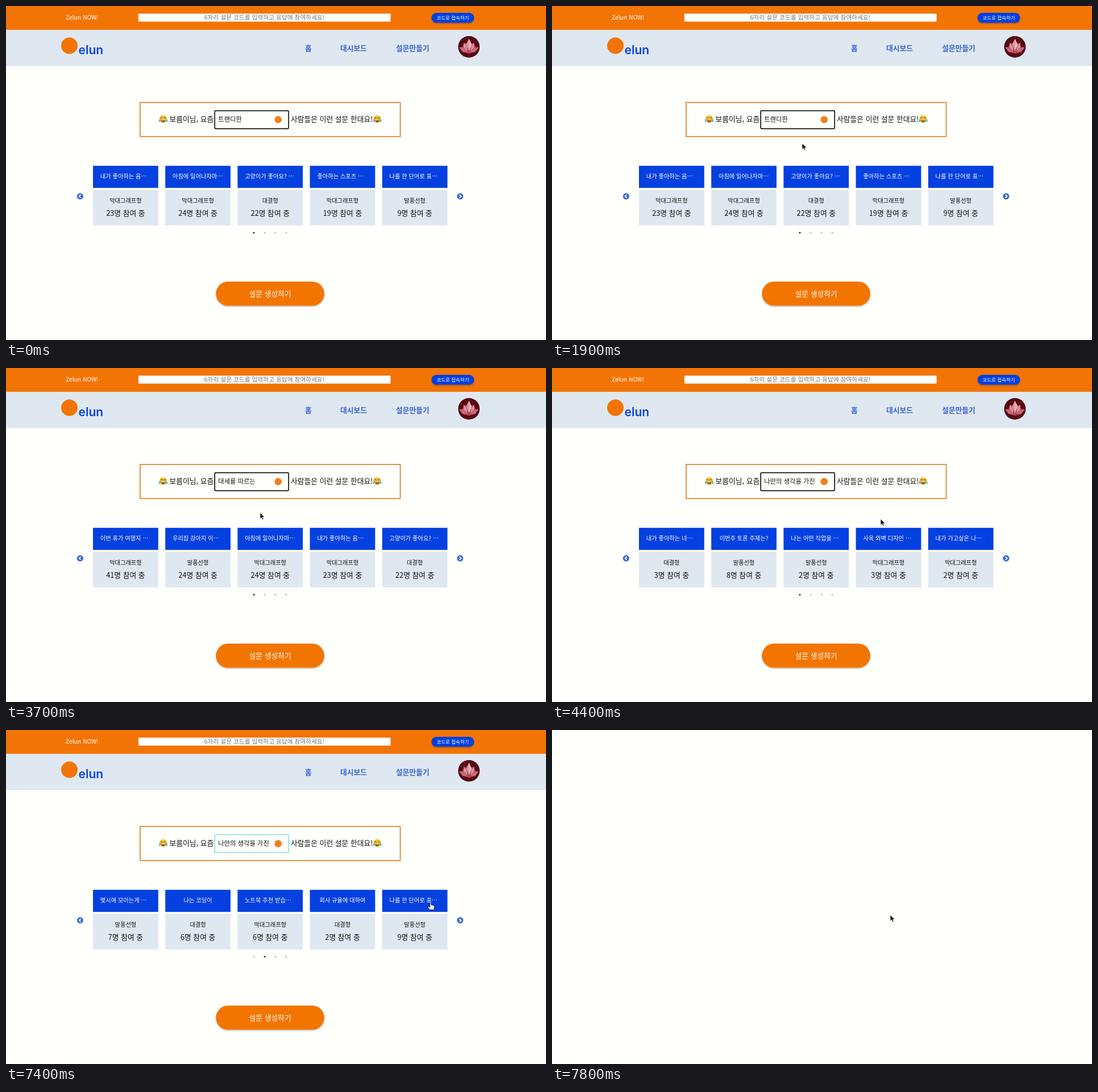
Write an HTML page that moves like this. It is 950x589 px and loops after 8 s.

```html
<!DOCTYPE html>
<html lang="ko">
<head>
<meta charset="utf-8">
<title>설문</title>
<style>
  html, body { margin: 0; width: 100%; height: 100%; overflow: hidden; background: #fffffc; }
  svg { display: block; width: 100%; height: 100%; }
  text { font-family: "Noto Sans CJK KR", "Noto Sans CJK", "Noto Sans", sans-serif; font-size: 12.8px; fill: #111; }
  .mid { text-anchor: middle; }
  .small { font-size: 10.24px; }
  .white { fill: #fff; }
  .menu { font-weight: 600; fill: #3763d8; }
  .pick { font-size: 11.3px; font-weight: 500; }
  .option { font-size: 11.2px; }
</style>
</head>
<body>
<svg viewBox="0 0 950 589">
  <defs>
    <filter id="soft" x="-20%" y="-30%" width="140%" height="170%">
      <feDropShadow dx="0" dy="1.5" stdDeviation="1.3" flood-opacity=".3"/>
    </filter>
    <filter id="deep" x="-20%" y="-30%" width="140%" height="180%">
      <feDropShadow dx="0" dy="2" stdDeviation="2.6" flood-opacity=".35"/>
    </filter>
    <g id="joy">
      <circle r="7" fill="#fcc52c"/>
      <path d="M-4.6-1.8Q-3-4-1.3-1.8M1.3-1.8Q3-4 4.6-1.8" fill="none" stroke="#5d4037" stroke-width="1.1"/>
      <path d="M-4 .6H4Q3.5 5 0 5T-4 .6Z" fill="#5d4037"/>
      <path d="M-3.6 .8H3.6L3 2.2H-3Z" fill="#fff"/>
      <path d="M-4.5-.6Q-8.4 1-7.5 4T-4.8 2.8ZM4.5-.6Q8.4 1 7.5 4T4.8 2.8Z" fill="#45b5ee"/>
    </g>
  </defs>
  <rect width="950" height="589" fill="#fffffc"/>

  <g id="page">
    <rect width="950" height="42.3" fill="#f27405"/>
    <rect y="42.3" width="950" height="63.7" fill="#dfe8f0"/>
    <text class="white" x="105" y="24.3" style="font-size:10.3px;font-weight:500">Zelun NOW!</text>
    <rect x="233" y="13.5" width="443.5" height="14" rx="1" fill="#fffffc" stroke="#d9c7b0" stroke-width=".5"/>
    <text class="mid" x="454.5" y="24.2" style="font-size:10.72px;fill:#757575">6자리 설문 코드를 입력하고 응답에 참여하세요!</text>
    <rect x="748.5" y="12" width="75" height="17.6" rx="8.8" fill="#0541e0" filter="url(#soft)"/>
    <text class="mid white" x="786" y="24" style="font-size:8.53px">코드로 접속하기</text>

    <circle cx="111.5" cy="70" r="14.5" fill="#f27405"/>
    <text x="127.5" y="84.5" style="font:600 21px Inter,sans-serif;fill:#0a44e0">elun</text>
    <text class="menu" x="526" y="79">홈</text>
    <text class="menu" x="588" y="79">대시보드</text>
    <text class="menu" x="686" y="79">설문만들기</text>
    <g transform="translate(814.4 72)">
      <circle r="19" fill="#560a14"/>
      <path d="M-17 1L-10 0L-9-7L-4-6L0-14L4-6L9-7L10 0L17 1L11 9L0 12L-11 9Z" fill="#b4475a"/>
      <path d="M0-14L5-4L0 7L-5-4ZM-9-7L-4-1L-3 8L-10 0ZM9-7L4-1L3 8L10 0Z" fill="#dc919d"/>
      <path d="M-17 1L-9 2L-3 9L-11 9ZM17 1L9 2L3 9L11 9Z" fill="#c8697a"/>
      <path d="M0-14L5-4L0 7Z" fill="#e8b4ba"/>
    </g>

    <rect x="236" y="170.1" width="457.6" height="60.2" fill="none" stroke="#db7b18" stroke-width="1.6"/>
    <use href="#joy" x="276.6" y="199.6"/>
    <text x="287.5" y="204">보름이님, 요즘</text>
    <text x="501" y="204">사람들은 이런 설문 한대요!</text>
    <use href="#joy" x="653" y="199.6"/>
    <rect id="box" x="367.2" y="184.7" width="130" height="31.6" rx="2" fill="#fffffc"/>
    <text id="pick" class="pick" x="373.3" y="203.8"></text>
    <circle cx="478.8" cy="200.4" r="6.3" fill="#f27f1a"/>

    <g id="cards"></g>
    <g id="arrows"></g>
    <g id="dots"></g>

    <rect x="369.3" y="486" width="190.7" height="42.6" rx="21.3" fill="#f27405" filter="url(#soft)"/>
    <text class="mid white" x="464.7" y="511.6" style="font-weight:500">설문 생성하기</text>

    <g id="list">
      <rect x="367" y="217" width="130.4" height="47.4" fill="#fffffc" stroke="#777" stroke-width=".9" filter="url(#deep)"/>
      <rect id="mark" x="367.5" width="129.5" height="15.6" fill="#2090f8"/>
      <g id="options"></g>
    </g>
  </g>

  <g id="cursor">
    <path id="arrow" d="M0 0V11.2L2.6 8.8L4.4 12.8L6.3 12L4.6 8.1H8Z" fill="#111" stroke="#fff" stroke-width=".8"/>
    <path id="hand" d="M-1.2 6.5V1Q0-.8 1.2 1V4.2Q2.6 3.4 3.4 4.6Q4.7 4 5.2 5.2Q6.8 4.8 6.8 6.5V9L5.6 12.6H-1.4L-4.9 8Q-5.4 6.2-3.6 6.4L-1.2 8.2Z" fill="#fff" stroke="#111" stroke-width=".9" stroke-linejoin="round"/>
  </g>
</svg>

<script>
const LOOP = 8000, STEP = 100, PITCH = 127.2, ROW = 15.6, LIST_TOP = 217.4;
const $ = id => document.getElementById(id);

function add(parent, tag, attrs, text = '') {
  const el = document.createElementNS('http://www.w3.org/2000/svg', tag);
  for (const k in attrs) el.setAttribute(k, attrs[k]);
  el.textContent = text;
  return parent.appendChild(el);
}

const choices = ['트랜디한', '대세를 따르는', '나만의 생각을 가진'];
const kinds = { b: '막대그래프형', v: '대결형', s: '말풍선형' };

// title | kind and number of people
const surveys = [
  ['내가 좋아하는 음⋯|b23', '아침에 일어나자마⋯|b24', '고양이가 좋아요? ⋯|v22', '좋아하는 스포츠 ⋯|b19', '나를 한 단어로 표⋯|s9'],
  ['이번 휴가 여행지 ⋯|b41', '우리집 강아지 이⋯|s24', '아침에 일어나자마⋯|b24', '내가 좋아하는 음⋯|b23', '고양이가 좋아요? ⋯|v22'],
  ['내가 좋아하는 녀⋯|v3', '이번주 토론 주제는?|s8', '나는 어떤 직업을 ⋯|s2', '사옥 외벽 디자인 ⋯|b3', '내가 가고싶은 나⋯|b2'],
  ['몇시에 모이는게 ⋯|s7', '나는 코딩이|v6', '노트북 추천 받습⋯|b6', '회사 규율에 대하여|v2', '나를 한 단어로 표⋯|s9']
];

// pointer moves: first step, last step, x, y
const moves = [
  [500, 900, 494, 200], [1400, 1400, 439, 220], [1500, 1600, 440, 242],
  [2000, 2300, 444.5, 203], [3000, 3300, 447, 255], [4200, 4400, 578, 266],
  [5300, 5700, 803, 333], [5800, 5900, 798, 334], [6600, 6600, 798.5, 335.5],
  [6800, 7100, 747, 304.5], [7700, 7800, 595, 326]
];

const cards = surveys[0].map((_, i) => {
  const x = 153 + PITCH * i, g = $('cards'), mid = x + 57.4;
  add(g, 'rect', { x, y: 281.8, width: 114.8, height: 39, fill: '#0541e0' });
  add(g, 'rect', { x, y: 324, width: 114.8, height: 63, fill: '#dfe8f0' });
  return {
    x, mid,
    title: add(g, 'text', { class: 'small white', y: 304 }),
    kind: add(g, 'text', { class: 'small mid', x: mid, y: 346.5 }),
    count: add(g, 'text', { class: 'mid', x: mid, y: 370 })
  };
});

const arrows = [[130.4, -1], [798.9, 1]].map(([x, dir]) => {
  const g = add($('arrows'), 'g', { transform: `translate(${x} 335.6) scale(${dir} 1)` });
  const disc = add(g, 'circle', { r: 5.6, fill: '#3d6bdc' });
  add(g, 'path', { d: 'M-1.2-2.8L1.7 0L-1.2 2.8', fill: 'none', stroke: '#fff', 'stroke-width': 1.7 });
  return disc;
});
const dots = [0, 1, 2, 3].map(i => add($('dots'), 'circle', { cx: 436 + 19 * i, cy: 399.8, r: 1.5 }));
const options = choices.map((s, i) =>
  add($('options'), 'text', { class: 'option', x: 373, y: 228.6 + ROW * i }, s));

function pointer(t) {
  let x = 959, y = 379;
  for (const [from, to, tx, ty] of moves) {
    if (t < from) break;
    const p = Math.min(1, (t - from + STEP) / (to - from + STEP));
    const e = p * p * (3 - 2 * p);
    x += (tx - x) * e;
    y += (ty - y) * e;
  }
  return [x, y];
}

const show = (el, on) => el.setAttribute('visibility', on ? 'inherit' : 'hidden');

let shown = -1;
function showCards(n) {
  if (n === shown) return;
  shown = n;
  cards.forEach((c, i) => {
    const [title, info] = surveys[n][i].split('|');
    const cut = title.endsWith('⋯');
    c.title.textContent = title;
    c.title.setAttribute('x', cut ? c.x + 12.8 : c.mid);
    c.title.setAttribute('text-anchor', cut ? 'start' : 'middle');
    c.kind.textContent = kinds[info[0]];
    c.count.textContent = info.slice(1) + '명 참여 중';
  });
}

function draw(time) {
  const t = Math.floor(time % LOOP / STEP) * STEP;
  const blank = t >= 7600;
  const [x, y] = pointer(t);
  show($('page'), !blank);

  const choice = t < 2200 ? 0 : t < 4000 ? 1 : 2;
  $('pick').textContent = choices[choice];
  showCards(t < 6100 ? choice : 3);
  dots.forEach((d, i) => d.setAttribute('fill', i === (t < 6100 ? 0 : 1) ? '#2b2b2b' : '#bdbdbd'));

  const focus = t < 5900;
  $('box').setAttribute('stroke', focus ? '#111' : '#55d3c6');
  $('box').setAttribute('stroke-width', focus ? 1.7 : 1.1);
  arrows[1].setAttribute('fill', t >= 5700 && t < 7400 ? '#0a3fc0' : '#3d6bdc');

  const open = !blank && (t >= 1000 && t < 1900 || t >= 2700 && t < 3700);
  const row = y < LIST_TOP ? choice : Math.min(2, Math.floor((y - LIST_TOP) / ROW));
  show($('list'), open);
  $('mark').setAttribute('y', LIST_TOP + ROW * row);
  options.forEach((o, i) => { o.style.fill = i === row ? '#fff' : '#111'; });

  const onCard = x > 153 && x < 777 && y > 282 && y < 387 && (x - 153) % PITCH < 115;
  const onArrow = Math.hypot(x - 799, y - 335.6) < 7;
  const hand = !blank && !open && (onCard || onArrow);
  show($('cursor'), t >= 500);
  show($('hand'), hand);
  show($('arrow'), !hand);
  $('cursor').setAttribute('transform', `translate(${x} ${y})`);
}

const start = performance.now();
function tick() {
  draw(performance.now() - start);
  requestAnimationFrame(tick);
}
tick();
</script>
</body>
</html>
```
